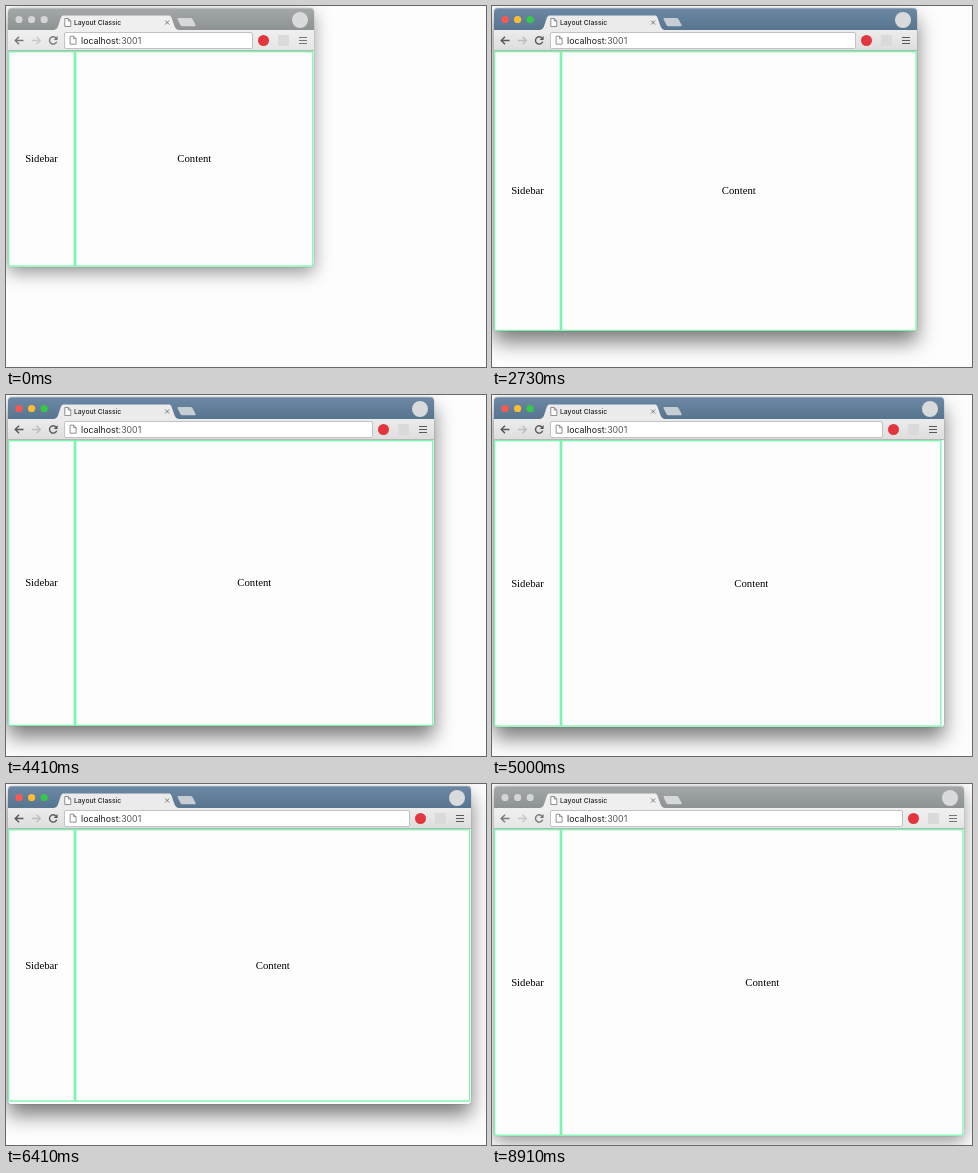
An HTML page that plays this animation: 480 by 361 pixels, repeating every 8960 ms.

```html
<!DOCTYPE html>
<html lang="en">
<head>
<meta charset="utf-8">
<title>Resizing window</title>
<style>
  html, body { margin: 0; width: 100%; height: 100%; overflow: hidden; background: #fefdfe; }
  body { position: relative; }
  body * { box-sizing: border-box; }

  #win {
    position: absolute; left: 2px; top: 2px;
    border-radius: 4px 4px 3px 3px;
    background: #fefdfe;
    box-shadow: 0 6px 17px rgba(0,0,0,.4), 0 0 1px rgba(0,0,0,.4);
    --bar: linear-gradient(#a4a8a9, #8d9293);
    --tool: linear-gradient(#f0f0f0, #e6e6e6);
    --tab: #efefef; --plus: #d6d8d9; --ink: #777; --dim: #c8c8c8;
    --red: #d3d5d6; --yellow: #d3d5d6; --green: #d3d5d6;
  }
  #win.active {
    box-shadow: 0 11px 20px rgba(0,0,0,.52), 0 0 1px rgba(0,0,0,.5);
    --bar: linear-gradient(#6c88a4, #587590);
    --tool: linear-gradient(#ececec, #dedede);
    --tab: #ebebeb; --plus: #c6cdd3; --ink: #585858; --dim: #bdbdbd;
    --red: #fc5850; --yellow: #fdbd31; --green: #35c84a;
  }

  #bar {
    position: absolute; left: 0; right: 0; top: 0; height: 22px;
    border-radius: 4px 4px 0 0; background: var(--bar); overflow: hidden;
    box-shadow: inset 0 1px rgba(255,255,255,.22);
  }
  #tool {
    position: absolute; left: 0; right: 0; top: 22px; height: 21px;
    background: var(--tool); border-bottom: 1px solid #b6b6b6;
  }
  #chrome {
    position: absolute; left: 0; top: 0; width: 200px; height: 43px;
    font: 500 6.8px Inter, Arial, sans-serif;
  }
  #address {
    position: absolute; left: 56px; right: 61px; top: 2px; height: 17px;
    border: 1px solid #c2c2c2; border-radius: 2px; background: #fff;
    font: 8.8px/16px Inter, Arial, sans-serif;
    padding-left: 16px; white-space: nowrap; color: #1c1c1c;
  }
  #address span { color: #555; }
  .icon { position: absolute; }
  #avatar { right: 6px; top: 4px; width: 16px; height: 16px; border-radius: 50%; background: #d8dadb; }
  #stop { right: 45px; top: 5px; width: 11px; height: 11px; border-radius: 50%; background: #e2353d; }
  #ext { right: 25px; top: 5px; width: 11px; height: 11px; background: #dadada; }
  #menu {
    right: 7px; top: 7px; width: 8px; height: 7px;
    background: repeating-linear-gradient(var(--ink) 0 1px, transparent 1px 3px);
  }

  #view {
    position: absolute; left: 0; right: 0; top: 43px; bottom: 0;
    overflow: hidden; border-radius: 0 0 3px 3px;
  }
  #page {
    position: absolute; left: .4px; top: 0; display: flex;
    transform: scale(.67); transform-origin: 0 0;
    font: 16px/18px "Liberation Serif", "Times New Roman", serif; color: #000;
  }
  #page div {
    display: flex; align-items: center; justify-content: center;
    border: 2px solid #7bf5ad;
  }
  #side { flex: 0 0 100px; }
  #main { flex: 1; }
</style>
</head>
<body>
<div id="win">
  <div id="bar"><div class="icon" id="avatar"></div></div>
  <div id="tool">
    <div id="address">localhost<span>:3001</span></div>
    <div class="icon" id="stop"></div>
    <div class="icon" id="ext"></div>
    <div class="icon" id="menu"></div>
  </div>
  <svg id="chrome" viewBox="2 2 200 43" fill="none">
    <circle cx="13" cy="13.5" r="3.6" fill="var(--red)"/>
    <circle cx="25.6" cy="13.5" r="3.6" fill="var(--yellow)"/>
    <circle cx="38.2" cy="13.5" r="3.6" fill="var(--green)"/>
    <path d="M48 24C52 23 52 20 53.500 16C55 11 55.500 9.500 58 9.500H162.500C165 9.500 165.500 11 167 16C168.500 20 169 23 172.500 24Z" fill="var(--tab)"/>
    <path d="M172.500 12H184.500Q186 12 186.600 13.300L189.600 19Q190 20.300 188.700 20.300H176.500Q175 20.300 174.400 19L171.600 13.300Q171.200 12 172.500 12Z" fill="var(--plus)"/>
    <text x="68" y="19" fill="#222">Layout Classic</text>
    <path d="M159.200 14.500l4 4m0-4l-4 4" stroke="#6d6d6d" stroke-width=".9"/>
    <path id="sheet" d="M58.800 12.500H62.300L64.800 15V20.500H58.800ZM62.300 12.500V15H64.800" fill="#fff" stroke="#777" stroke-width=".8"/>
    <use href="#sheet" x="5.300" y="17.700"/>
    <g stroke-width="1.4">
      <path d="M17.500 34.500H9.500M13 30.700L9.200 34.500L13 38.300" stroke="var(--ink)"/>
      <path d="M26 34.500H34M30.500 30.700L34.300 34.500L30.500 38.300" stroke="var(--dim)"/>
      <path d="M50 32A3.700 3.700 0 1 0 50.700 35.600" stroke="var(--ink)"/>
    </g>
    <path d="M51.600 30V34H47.600Z" fill="var(--ink)"/>
  </svg>
  <div id="view">
    <div id="page"><div id="side">Sidebar</div><div id="main">Content</div></div>
  </div>
</div>
<script>
  const LOOP = 8960, TICK = 45.5, START = 40;
  const FOCUS = 1400, BLUR = 8500;
  const ZOOM = .67, HEADER = 43;

  // turning points of the drag: time, width, height
  const drag = [
    [1820, 306, 259], [2150, 336, 279], [2700, 423, 323], [3229, 363, 273],
    [3629, 436, 329], [4380, 426, 329], [5418, 463, 330], [5718, 463, 296],
    [7200, 463, 346], [8100, 470, 350]
  ];

  const $ = id => document.getElementById(id);
  const win = $("win"), page = $("page");
  const ease = p => (1 - Math.cos(Math.PI * p)) / 2;

  function sizeAt(t) {
    const next = drag.findIndex(k => k[0] > t);
    if (next < 1) return drag.at(next).slice(1);
    const a = drag[next - 1], b = drag[next];
    const p = ease((t - a[0]) / (b[0] - a[0]));
    return [1, 2].map(n => Math.round(a[n] + (b[n] - a[n]) * p));
  }

  function resize(el, w, h) {
    el.style.width = w + "px";
    el.style.height = h + "px";
  }

  function draw(now) {
    const t = now % LOOP;
    const step = START + TICK * Math.floor((t - START + 4) / TICK);
    const [w, h] = sizeAt(step);
    // the page relayouts one tick after the window
    const [pw, ph] = sizeAt(step - TICK);
    resize(win, w, h);
    resize(page, (pw - .4) / ZOOM, (ph - HEADER) / ZOOM);
    win.classList.toggle("active", step >= FOCUS && step < BLUR);
  }

  const origin = performance.now();
  function loop() {
    draw(performance.now() - origin);
    requestAnimationFrame(loop);
  }
  loop();
</script>
</body>
</html>
```
